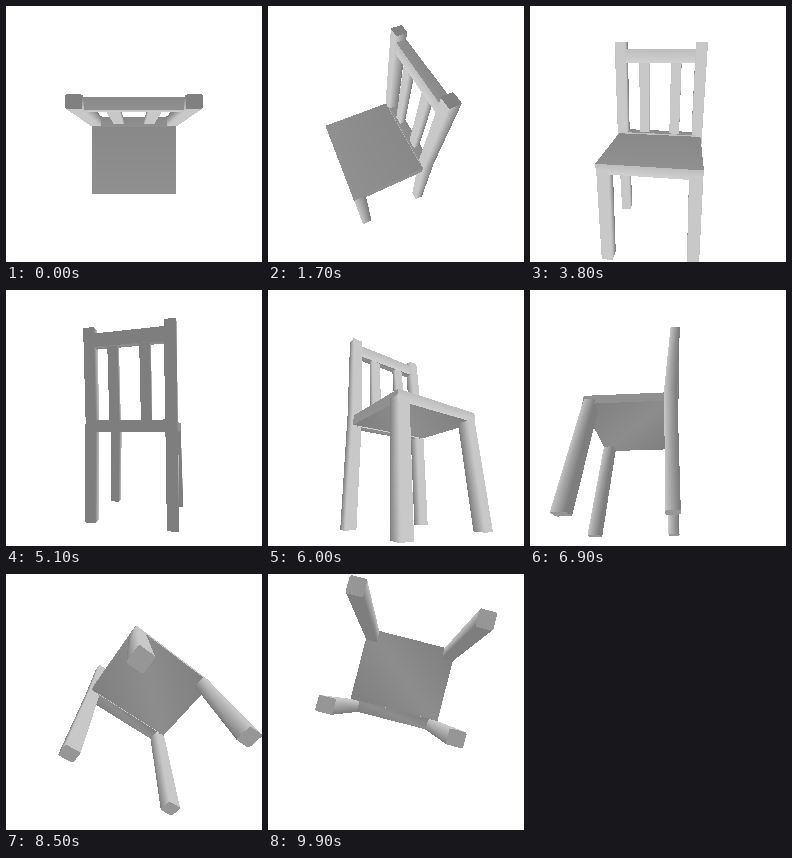
An HTML page with a canvas for the animation above (10 s loop, 256 by 256 pixels).

```html
<!DOCTYPE html>
<html lang="en">
<head>
<meta charset="utf-8">
<title>Chair turntable</title>
<style>
html, body { margin: 0; width: 100%; height: 100%; overflow: hidden; background: #fff; }
canvas { display: block; width: 100vw; height: 100vh; }
</style>
</head>
<body>
<canvas id="view" width="256" height="256"></canvas>
<script>
const SIZE = 256, MID = SIZE / 2, DIST = 240, STEPS = 100, STEP_MS = 100;
const ctx = document.getElementById('view').getContext('2d');
const image = ctx.createImageData(SIZE, SIZE);
const pixels = new Uint32Array(image.data.buffer);
const depth = new Float32Array(SIZE * SIZE);
const tris = [];

// x: right, y: up, z: towards the front of the chair
const shade = (nx, ny, nz) =>
  126 + Math.max(0, 18 * Math.abs(nx) + 10 * ny + 82 * nz);
const vert = (x, y, z, v) => ({ x, y, z, v });

function face(points) {
  for (let k = 2; k < points.length; k++) tris.push([points[0], points[k - 1], points[k]]);
}

// Block whose z range may differ between bottom and top
function block(hw, y0, y1, [b0, f0], [b1, f1]) {
  const quad = (list, ...v) => face(list.map((p, k) => vert(...p, v[k % v.length])));
  const a = [-hw, y0, b0], b = [hw, y0, b0], c = [hw, y0, f0], d = [-hw, y0, f0];
  const e = [-hw, y1, b1], f = [hw, y1, b1], g = [hw, y1, f1], h = [-hw, y1, f1];
  const top = shade(0, 1, 0), under = shade(0, -1, 0), soft = shade(0, -1, 0.3);
  const front = shade(0, 0, 1), edge = shade(0, 0.6, 0.7);
  quad([e, f, g, h], top, top, top + 8, top + 8);
  quad([a, b, f, e], shade(0, 0, -1));
  quad([d, c, g, h], front, front, edge, edge);
  quad([a, d, h, e], shade(-1, 0, 0));
  quad([b, c, g, f], shade(1, 0, 0));
  quad([d, a, b, c], soft, under, soft, under);
}

// Bar with softened corners, swept through rings of [y, x, z, halfWidth, halfDepth]
function bar(rings) {
  const c = 0.85;
  const outline = [[1, c], [c, 1], [-c, 1], [-1, c], [-1, -c], [-c, -1], [c, -1], [1, -c]];
  const loops = rings.map(([y, x, z, hw, hd]) => outline.map(([px, pz]) => {
    const len = Math.hypot(px, pz);
    return vert(x + px * hw, y, z + pz * hd, shade(px / len, 0, pz / len));
  }));
  for (let r = 1; r < loops.length; r++) {
    const p = loops[r - 1], q = loops[r];
    for (let k = 0; k < 8; k++) {
      const m = (k + 1) % 8;
      face([p[k], p[m], q[m], q[k]]);
    }
  }
  const cap = (loop, v) => face(loop.map(p => ({ ...p, v })));
  cap(loops[0], 128);
  cap(loops[loops.length - 1], 150);
}

for (const s of [-1, 1]) {
  bar([[85.5, 38.7 * s, -20.8, 5.4, 4.9], [0, 38.7 * s, -13.5, 5.3, 5.5],
       [-100.5, 39.2 * s, -11.8, 5.2, 4.8]]);
  bar([[-8, 37 * s, 55.5, 5.4, 5.6], [-100.5, 39 * s, 59.5, 5.3, 5.5]]);
  bar([[69, 15.5 * s, -19.5, 5, 3], [-4, 15.5 * s, -12.5, 5, 3]]);
}
block(42.4, -13, -4, [-10, 61.2], [-10, 61.2]);
block(38, -14, -2.5, [-18, -7.5], [-17, -7.5]);
block(38, 67, 79.5, [-24, -16], [-25, -16]);

function fillTri(a, b, c) {
  const area = (b.X - a.X) * (c.Y - a.Y) - (c.X - a.X) * (b.Y - a.Y);
  if (Math.abs(area) < 1e-6) return;
  const lo = (...n) => Math.max(0, Math.floor(Math.min(...n)));
  const hi = (...n) => Math.min(SIZE - 1, Math.ceil(Math.max(...n)));
  const x0 = lo(a.X, b.X, c.X), x1 = hi(a.X, b.X, c.X);
  const y0 = lo(a.Y, b.Y, c.Y), y1 = hi(a.Y, b.Y, c.Y);
  for (let y = y0; y <= y1; y++) {
    for (let x = x0; x <= x1; x++) {
      const px = x + 0.5, py = y + 0.5;
      const wb = ((px - a.X) * (c.Y - a.Y) - (c.X - a.X) * (py - a.Y)) / area;
      const wc = ((b.X - a.X) * (py - a.Y) - (px - a.X) * (b.Y - a.Y)) / area;
      const wa = 1 - wb - wc;
      if (wa < 0 || wb < 0 || wc < 0) continue;
      const near = wa * a.s + wb * b.s + wc * c.s, at = y * SIZE + x;
      if (near <= depth[at]) continue;
      depth[at] = near;
      const v = Math.round(wa * a.v + wb * b.v + wc * c.v);
      pixels[at] = (0xff000000 | v << 16 | v << 8 | v) >>> 0;
    }
  }
}

// Four turns per loop while the view sinks from straight above to straight below;
// the up direction flips at both poles
function draw(step) {
  const rad = Math.PI / 180;
  const pole = step === 0 || step === STEPS - 1;
  const turn = (14.4 * step + (pole ? 0 : 180)) * rad;
  const tilt = (90 - 180 * step / (STEPS - 1)) * rad;
  const ca = Math.cos(turn), sa = Math.sin(turn);
  const ce = Math.cos(tilt), se = Math.sin(tilt);
  const project = p => {
    const side = p.x * ca - p.z * sa, ahead = p.x * sa + p.z * ca;
    const s = DIST / (DIST - ahead * ce - p.y * se);
    return { X: MID + side * s, Y: MID - (p.y * ce - ahead * se) * s, s, v: p.v };
  };
  pixels.fill(0xffffffff);
  depth.fill(0);
  for (const t of tris) fillTri(...t.map(project));
  ctx.putImageData(image, 0, 0);
}

let shown = -1;
function tick() {
  const step = Math.floor(performance.now() / STEP_MS) % STEPS;
  if (step !== shown) draw(shown = step);
  requestAnimationFrame(tick);
}
tick();
</script>
</body>
</html>
```
